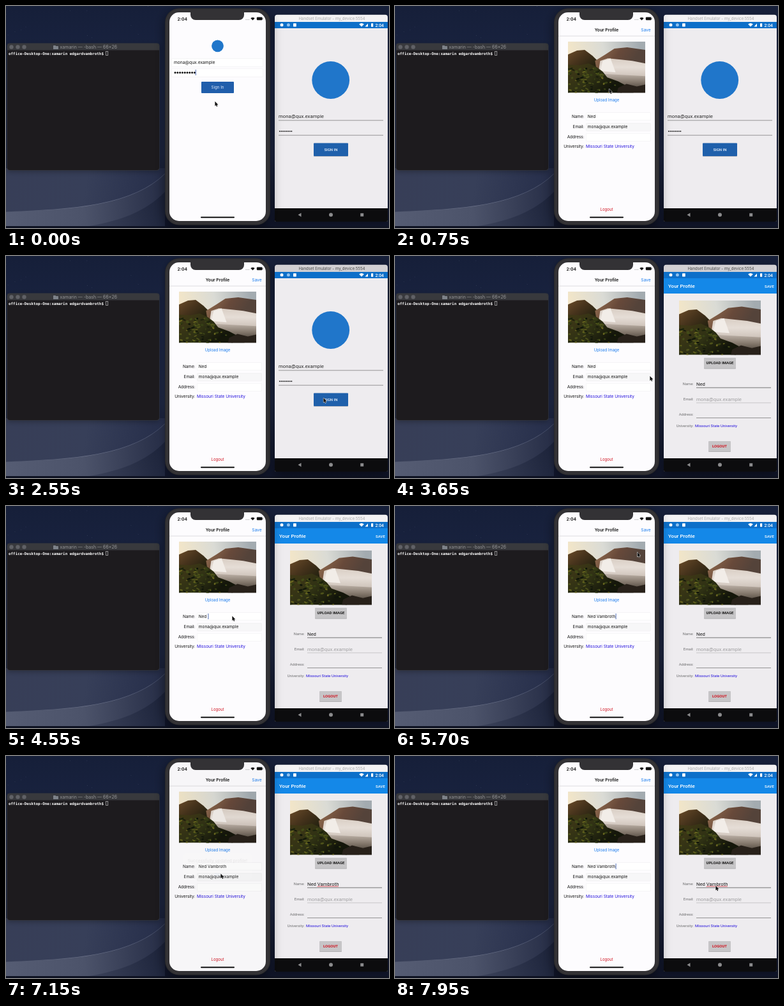
These frames come from a looping animation (600x349 px, 8 s). An HTML page with a canvas:

```html
<!DOCTYPE html>
<html lang="en">
<head>
<meta charset="utf-8">
<title>Profile sync demo</title>
<style>
html, body { margin: 0; width: 100%; height: 100%; overflow: hidden; background: #161c33; }
canvas { display: block; width: 600px; height: 349px; }
</style>
</head>
<body>
<canvas id="stage" width="600" height="349"></canvas>
<script>
const LOOP = 8000;
const IOS = 'Inter, sans-serif';
const DROID = 'Roboto, sans-serif';
const MONO = '"DejaVu Sans Mono", monospace';
const EMAIL = 'mona@qux.example';
const FIRST = 'Ned';
const LAST = 'Vambroth';
const SCHOOL = 'Missouri State University';
const BLUE = '#2076ca';

// When each event happens, in ms
const AT = {
  iosLogin: 450, droidFocus: 2150, droidLogin: 2750, iosFocus: 4050,
  typing: 4550, key: 75, alert: 5950, synced: 6500, dismiss: 6900
};

// Pointer path: time, x, y
const POINTER = [
  [0, 327, 150], [200, 335, 130], [1150, 335, 130], [1950, 497, 223],
  [3150, 497, 223], [3950, 354, 173], [5400, 354, 173], [5850, 388, 38],
  [6300, 388, 38], [6800, 336, 185], [7200, 336, 185], [7750, 502, 204]
];

const ctx = document.getElementById('stage').getContext('2d');

const clamp = v => Math.max(0, Math.min(1, v));
const smooth = v => v * v * (3 - 2 * v);

function rect(x, y, w, h, color, radius = 0) {
  ctx.fillStyle = color;
  ctx.beginPath();
  ctx.roundRect(x, y, w, h, radius);
  ctx.fill();
}

// Base shape of a window, with the drop shadow it casts
function windowBase(x, y, w, h, color, radius, active) {
  ctx.save();
  ctx.shadowColor = active ? 'rgba(0,0,0,.5)' : 'rgba(0,0,0,.3)';
  ctx.shadowBlur = active ? 18 : 9;
  ctx.shadowOffsetY = active ? 5 : 2;
  rect(x, y, w, h, color, radius);
  ctx.restore();
}

function disc(x, y, r, color) {
  ctx.fillStyle = color;
  ctx.beginPath();
  ctx.arc(x, y, r, 0, 7);
  ctx.fill();
}

function poly(points, color) {
  ctx.fillStyle = color;
  ctx.beginPath();
  points.forEach(([x, y]) => ctx.lineTo(x, y));
  ctx.closePath();
  ctx.fill();
}

function text(str, x, y, size, color, family, align = 'left', weight = 400) {
  ctx.font = `${weight} ${size}px ${family}`;
  ctx.textAlign = align;
  ctx.fillStyle = color;
  ctx.fillText(str, x, y);
}

function gradient(x0, y0, x1, y1, ...colors) {
  const g = ctx.createLinearGradient(x0, y0, x1, y1);
  colors.forEach((c, i) => g.addColorStop(i / (colors.length - 1), c));
  return g;
}

function dots(n, x, y, step, r) {
  for (let i = 0; i < n; i++) disc(x + i * step, y, r, '#111');
}

function random(seed) {
  return () => (seed = (seed * 16807) % 2147483647) / 2147483647;
}

function wallpaper() {
  rect(0, 0, 600, 349, gradient(0, 0, 0, 349, '#161f39', '#1a2442', '#1e2743', '#0f1428'));
  const rnd = random(17);
  for (let i = 0; i < 12; i++) disc(rnd() * 245, rnd() * 56, 0.4, '#4c5674');
  rect(0, 255, 249, 94, gradient(0, 258, 249, 300, '#373e57', '#373f59', '#252d49'));
  ctx.fillStyle = gradient(0, 330, 245, 320, '#555c73', '#4c536a', '#272e47');
  ctx.strokeStyle = gradient(0, 0, 249, 0, '#4a5168', '#6b7289', '#434b65');
  ctx.lineWidth = 1.2;
  ctx.beginPath();
  ctx.moveTo(0, 324);
  ctx.bezierCurveTo(90, 320, 195, 318, 249, 264);
  ctx.stroke();
  ctx.lineTo(249, 349);
  ctx.lineTo(0, 349);
  ctx.fill();
  ctx.fillStyle = gradient(140, 349, 249, 310, '#3a4159', '#1c233a');
  ctx.beginPath();
  ctx.moveTo(110, 349);
  ctx.bezierCurveTo(180, 340, 220, 322, 249, 292);
  ctx.lineTo(249, 349);
  ctx.fill();
  rect(0, 346, 600, 3, '#0e1222');
}

function terminal() {
  windowBase(1.5, 58.5, 239, 200, '#3b3c41', 4, false);
  rect(2, 59, 238, 199, '#1d1b1e', 4);
  rect(2, 59, 238, 10.5, '#38393d', [4, 4, 0, 0]);
  [8.5, 18.5, 28.5].forEach(x => disc(x, 64.5, 3.2, '#606166'));
  rect(74, 62, 4, 2, '#7d8289', 0.5);
  rect(74, 63, 8, 5, '#7d8289', 0.6);
  text('xamarin — -bash — 66×26', 84.5, 67.3, 7, '#96979a', IOS);
  text('office-Desktop-One:xamarin edgardvambroth$', 4, 76.5, 5.9, '#fff', MONO, 'left', 700);
  ctx.strokeStyle = '#aaa';
  ctx.lineWidth = 0.8;
  ctx.strokeRect(156.5, 71.5, 3.2, 6);
}

function photo(x, y, w, h) {
  ctx.save();
  ctx.beginPath();
  ctx.rect(x, y, w, h);
  ctx.clip();
  ctx.translate(x, y);
  ctx.scale(w / 120, h / 80);
  rect(0, 0, 120, 80, gradient(0, 20, 110, 0, '#f3e6c8', '#dadbd5', '#a3abb0'));
  poly([[0, 20], [14, 14], [26, 13], [38, 22], [50, 34], [52, 48], [0, 50]],
    gradient(0, 12, 30, 48, '#6b4c29', '#46331c', '#252210'));
  poly([[42, 30], [58, 20], [72, 11], [92, 9], [120, 13], [120, 50], [45, 48]],
    gradient(50, 14, 95, 42, '#8a664b', '#67493a', '#54433a'));
  rect(45, 46, 75, 34, gradient(0, 46, 0, 80, '#cfc4bb', '#85796d', '#302921'));
  poly([[50, 30], [62, 26], [82, 28], [100, 30], [120, 34], [120, 54], [47, 50]],
    gradient(0, 26, 0, 54, '#d9cec4', '#e5ddd6', '#cfc4bb'));
  poly([[54, 30], [66, 26], [74, 48], [50, 46]], '#f2ede8');
  poly([[0, 36], [18, 37], [32, 34], [45, 40], [54, 47], [61, 56], [78, 62],
    [91, 69], [102, 80], [0, 80]], gradient(15, 34, 55, 80, '#3e3716', '#2f3114', '#14160a'));
  const rnd = random(91);
  const moss = ['#4d511a', '#363f15', '#66641f', '#1d230d', '#10150a', '#434c18'];
  for (let i = 0; i < 100; i++) {
    const py = 42 + rnd() * 38;
    const px = rnd() * (42 + (py - 42) * 1.25);
    ctx.fillStyle = moss[i % moss.length];
    ctx.beginPath();
    ctx.ellipse(px, py, 1 + rnd() * 2.4, 0.7 + rnd() * 1.1, rnd() - 0.5, 0, 7);
    ctx.fill();
  }
  poly([[78, 72], [91, 66], [107, 70], [120, 67], [120, 80], [76, 80]], '#28211a');
  ctx.restore();
}

function wifi(x, y, r, color) {
  ctx.fillStyle = color;
  ctx.beginPath();
  ctx.moveTo(x, y);
  ctx.arc(x, y, r, -2.36, -0.78);
  ctx.fill();
}

function caret(x, y) {
  rect(x, y, 0.9, 9, '#3f5fae');
}

function iosField(y, fill = '#fff') {
  rect(299, y, 102, 12.5, '#eeeeef', 1.5);
  rect(299.5, y + 0.5, 101, 11.5, fill, 1);
}

function iosLogin() {
  disc(331.5, 62.8, 9.4, BLUE);
  for (const y of [82.5, 98.5]) {
    rect(259, y, 144, 13, '#eeeeef', 1.5);
    rect(259.5, y + 0.5, 143, 12, '#fff', 1);
  }
  text(EMAIL, 263, 91.3, 6.7, '#111', IOS);
  dots(9, 265, 104.7, 3.8, 1.5);
  caret(296.8, 100);
  rect(306, 119, 51, 18, '#205eab', 1);
  text('Sign In', 331.5, 130.3, 6.2, '#dfeafb', IOS, 'center');
}

function iosProfile(t) {
  const typed = Math.max(0, Math.min(LAST.length, Math.floor((t - AT.typing) / AT.key)));
  const name = FIRST + (t >= AT.typing ? ' ' + LAST.slice(0, typed) : '');
  rect(256, 46.7, 151, 0.7, '#d4d4d6');
  text('Your Profile', 331.5, 39.8, 6.7, '#111', IOS, 'center', 600);
  text('Save', 400.5, 39.8, 6.6, '#1679ed', IOS, 'right');
  photo(271, 56, 121, 80.5);
  text('Upload Image', 331.5, 149.8, 6, '#1679ed', IOS, 'center');
  iosField(167.5);
  iosField(184, '#f7f7f8');
  iosField(200);
  [['Name:', 176], ['Email:', 192.2], ['Address:', 208.2], ['University:', 222.8]]
    .forEach(([label, y]) => text(label, 296.5, y, 6.4, '#111', IOS, 'right'));
  text(name, 301.8, 176, 6.4, '#111', IOS);
  const end = 302.2 + ctx.measureText(name).width;
  const editing = t >= AT.iosFocus && t < AT.alert || t > AT.dismiss + 400;
  if (editing) caret(end, 169);
  text(EMAIL, 301.8, 192.2, 6.5, '#111', IOS);
  text(SCHOOL, 299, 222.8, 6.45, '#2410dc', IOS);
  text('Logout', 331.5, 321.8, 6, '#d0121f', IOS, 'center');
}

function iosAlert(t) {
  const shown = smooth(clamp((t - AT.alert) / 200));
  const hidden = 1 - (1 - clamp((t - AT.dismiss) / 330)) ** 2;
  const alpha = shown * (1 - hidden);
  if (alpha <= 0) return;
  ctx.save();
  ctx.globalAlpha = alpha;
  rect(256, 10, 151, 328, 'rgba(0,0,0,.41)', 15);
  const scale = 1 + 0.15 * (1 - shown);
  ctx.translate(331.5, 173.5);
  ctx.scale(scale, scale);
  ctx.translate(-331.5, -173.5);
  rect(277, 152.5, 109, 42, '#f3f3f4', 6);
  text('Successfully updated profile!', 331.5, 167.2, 6.6, '#111', IOS, 'center', 600);
  rect(277, 177.5, 109, 0.6, '#cfcfd2');
  text('OK', 331.5, 188.5, 6.8, '#1679ed', IOS, 'center', 500);
  ctx.restore();
}

function iosPhone(t, active) {
  windowBase(249, 3.5, 165, 341, '#28282a', 22, active);
  rect(250, 4.5, 163, 339, '#333235', 21);
  rect(256, 10, 151, 328, '#fdfcfe', 15);
  text('2:04', 268.5, 22.5, 6.8, '#111', IOS, 'left', 600);
  [376, 378.2, 380.4].forEach(x => disc(x, 21.4, 0.55, '#999'));
  wifi(386.5, 22.5, 4.5, '#111');
  rect(392.8, 17.5, 8.8, 4.8, '#111', 1.2);
  rect(402, 19, 0.8, 1.8, '#777');
  if (t < AT.iosLogin) iosLogin();
  else iosProfile(t);
  rect(305, 331.3, 53, 1.9, '#111', 1);
  iosAlert(t);
  rect(289, 8, 84, 14, '#333235', [0, 0, 8, 8]);
}

function droidLogin() {
  disc(508.7, 116.5, 29.4, BLUE);
  text(EMAIL, 427, 176.4, 7.8, '#2a2a2a', DROID);
  rect(427, 179.4, 164, 0.8, '#777');
  dots(8, 428.8, 196.9, 2.65, 0.95);
  rect(427, 202.8, 164, 0.8, '#777');
  rect(482, 216.5, 54, 20.5, '#bdbdc2', 1);
  rect(482, 215.5, 54, 20.5, '#1f60ab', 1);
  text('SIGN IN', 509, 227.9, 6, '#eaf2fc', DROID, 'center', 500);
}

function droidButton(label, x, y, w, h, color) {
  rect(x, y + 1, w, h, '#b2b1b3', 1);
  rect(x, y, w, h, '#c6c5c7', 1);
  text(label, x + w / 2, y + h / 2 + 2.1, 6, color, DROID, 'center', 700);
}

function squiggle(x, y, w) {
  ctx.strokeStyle = '#e33b48';
  ctx.lineWidth = 0.9;
  ctx.beginPath();
  for (let i = 0; i <= w; i++) ctx.lineTo(x + i, y + (i % 2 ? 0.4 : -0.4));
  ctx.stroke();
}

function droidProfile(t) {
  rect(421, 35, 177, 24, '#1488e8');
  text('Your Profile', 428, 50.2, 8, '#fff', DROID, 'left', 500);
  text('SAVE', 594, 49.8, 6.1, '#fff', DROID, 'right', 500);
  photo(445, 70, 128, 85.5);
  droidButton('UPLOAD IMAGE', 484, 160, 50, 16.5, '#181818');
  [['Name:', 203], ['Email:', 227], ['Address:', 250.5], ['University:', 268.8]]
    .forEach(([label, y]) => text(label, 467.8, y, 5.9, '#6e6e70', DROID, 'right'));
  text(FIRST, 472, 203.8, 7.7, '#1c1c1c', DROID);
  if (t >= AT.synced) {
    const x = 472 + ctx.measureText(FIRST + ' ').width;
    text(LAST, x, 203.8, 7.7, '#1c1c1c', DROID);
    squiggle(x, 205, ctx.measureText(LAST).width);
  }
  text(EMAIL, 472, 227.6, 7.8, '#a1a0a2', DROID);
  rect(472, 206.6, 117, 0.8, '#777');
  rect(472, 230.6, 117, 0.7, '#bbb');
  rect(472, 254, 117, 0.8, '#777');
  text(SCHOOL, 470, 268.8, 6, '#2410dc', DROID);
  droidButton('LOGOUT', 491, 291, 35, 16, '#d0121f');
}

function droidPhone(t, active) {
  windowBase(421, 13.7, 177, 325, active ? '#d2d0d3' : '#f3f2f4', [4, 4, 2, 2], active);
  text('Handset Emulator - my_device:5554', 510.5, 21.9, 6.1, active ? '#444' : '#a9a8aa', IOS, 'center');
  rect(421, 25, 177, 294, '#eeecef');
  rect(421, 25, 177, 10, '#0d6fc9');
  disc(432, 29.8, 2.5, '#fff');
  disc(442.4, 29.8, 2.5, '#8fc0ee');
  rect(450, 27.2, 4.8, 5.2, '#fff', 0.6);
  wifi(557, 32.5, 5.4, '#fff');
  poly([[562.5, 32.5], [567, 27.5], [567, 32.5]], '#fff');
  rect(572, 27.3, 3.2, 5.4, '#fff', 0.5);
  text('2:04', 578.5, 32.6, 6.8, '#fff', DROID, 'left', 500);
  if (t < AT.droidLogin) droidLogin();
  else droidProfile(t);
  rect(421, 318, 177, 21, '#0c0c0e', [0, 0, 2, 2]);
  poly([[457.5, 328.3], [462.5, 325.2], [462.5, 331.4]], '#8b8b8d');
  disc(509, 328.3, 3, '#8b8b8d');
  rect(555.2, 325.8, 5, 5, '#8b8b8d');
}

function pointer(t) {
  let i = POINTER.length - 1;
  while (POINTER[i][0] > t) i--;
  const a = POINTER[i];
  const b = POINTER[i + 1] || a;
  const k = a === b ? 0 : smooth((t - a[0]) / (b[0] - a[0]));
  ctx.save();
  ctx.translate(a[1] + (b[1] - a[1]) * k, a[2] + (b[2] - a[2]) * k);
  ctx.lineJoin = 'round';
  ctx.strokeStyle = '#fff';
  ctx.lineWidth = 1;
  poly([[0.4, 0], [0.4, 7.2], [2, 5.8], [3, 8.3], [4.2, 7.8], [3.2, 5.4], [5.3, 5.2]], '#111');
  ctx.stroke();
  ctx.fill();
  ctx.restore();
}

function draw(now) {
  const t = now % LOOP;
  const droidActive = t >= AT.droidFocus && t < AT.iosFocus;
  wallpaper();
  terminal();
  // The focused window is drawn last so its shadow falls on the other
  if (droidActive) {
    iosPhone(t, false);
    droidPhone(t, true);
  } else {
    droidPhone(t, false);
    iosPhone(t, true);
  }
  pointer(t);
}

const start = performance.now();
function tick() {
  draw(performance.now() - start);
  requestAnimationFrame(tick);
}
tick();
</script>
</body>
</html>
```
